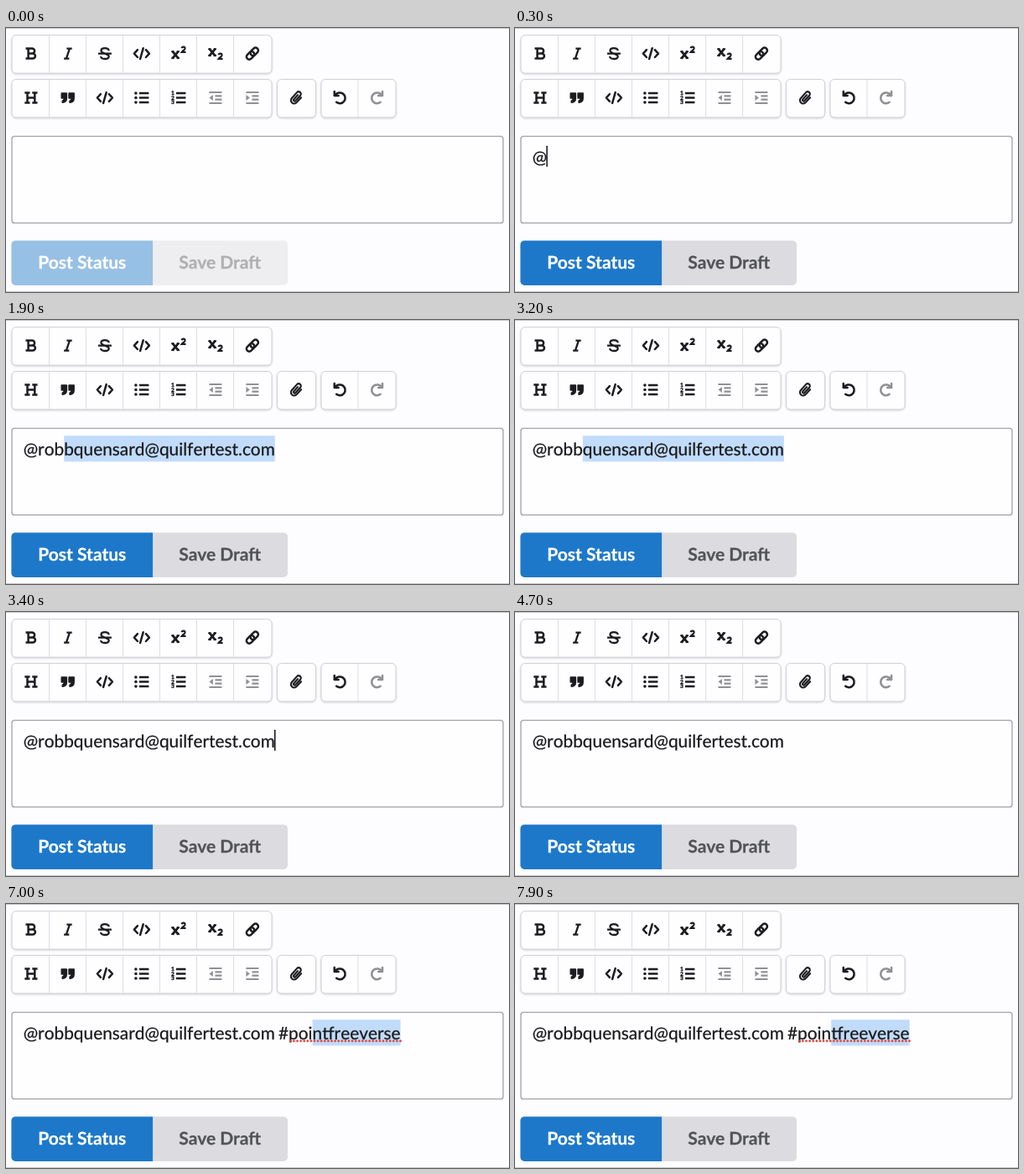
Write an HTML page that moves like this. It is 600 px wide and 316 px high and loops after 8000 ms.

```html
<!DOCTYPE html>
<html lang="en">
<head>
<meta charset="utf-8">
<title>Post editor</title>
<style>
  html, body { margin: 0; width: 100%; height: 100%; overflow: hidden; background: #fdfcfe; }
  svg { display: block; width: 600px; height: 316px; }
  text {
    font: 20.85px Lato, sans-serif; fill: #18191a; stroke: #18191a; stroke-width: .25;
    font-kerning: none; text-rendering: geometricPrecision; white-space: pre;
  }
  .label { font-size: 21px; font-weight: 700; font-kerning: normal; text-anchor: middle; }
  .panel { fill: #fefdff; stroke: #d1d0d4; filter: drop-shadow(0 1px 1px rgba(0, 0, 0, .16)); }
  .rule { stroke: #dedde1; }
  .icon { fill: none; stroke: #1b1c1d; stroke-width: 2.5; }
  .icon .solid { fill: #1b1c1d; stroke: none; }
  .icon text { font: 900 6.6px Lato, sans-serif; fill: #1b1c1d; }
  .dim { opacity: .48; }
  .round { stroke-linecap: round; stroke-linejoin: round; }
</style>
</head>
<body>
<svg viewBox="0 0 600 316">
  <path d="M0 .5H600M0 315.5H600" stroke="#c9c8cc"/>
  <g id="bar"></g>
  <rect x="7" y="129.6" width="586" height="103.8" rx="3" fill="#fefdff" stroke="#a2a1a6" stroke-width="1.3"/>
  <rect id="sel" y="138.5" height="31" fill="#c1dbfa"/>
  <text id="mention" x="20.7" y="162"></text>
  <text id="tag" x="325" y="162"></text>
  <path id="squiggle" d="M339.3 164H470.8" fill="none" stroke="#e2483d" stroke-width="2.8" stroke-linecap="round" stroke-dasharray="0 4.1"/>
  <rect id="caret" y="141" width="1.5" height="25" fill="#111"/>
  <g id="buttons">
    <path d="M175.4 254.4H11.4a5 5 0 0 0-5 5V303a5 5 0 0 0 5 5H175.4z" fill="#1d78c9"/>
    <path d="M175.4 254.4H331a5 5 0 0 1 5 5V303a5 5 0 0 1-5 5H175.4z" fill="#dcdce0"/>
    <text class="label" x="90.8" y="288" style="fill:#fff;stroke:#fff">Post Status</text>
    <text class="label" x="255.2" y="288" style="fill:#525355;stroke:#525355">Save Draft</text>
  </g>
</svg>
<script>
const $ = id => document.getElementById(id);

// Toolbar
const path = (d, attrs = '') => `<path d="${d}" ${attrs}/>`;
const two = y => path(`M3.6 ${y - 5}c.8-2.3 4.4-1.8 4 .6c-.3 1.4-2.5 2.6-3.8 4.2h4.8`, 'stroke-width="2.2"');
const ex = y => path(`M-7.6 ${y - 4.5}l7.6 9M0 ${y - 4.5}l-7.6 9`, 'stroke-width="2.8"') +
  path(`M-8.6 ${y - 4}h3.2M-2.2 ${y - 4}h3.2M-8.6 ${y + 4}h3.2M-2.2 ${y + 4}h3.2`, 'stroke-width="1.8"');
const rows = [-5.5, 0, 5.5];
const lines = path(rows.map(y => `M-3 ${y}H8.5`).join(''));
const shift = path('M-7.5-6.5H7.5M-.5-2.2H7.5M-.5 2.2H7.5M-7.5 6.5H7.5', 'stroke-width="2.2"');
const mark = x => path(`M${x}-5.5h6v6.2q0 4.5-5 5v-2q2.2-.6 2.2-3.2h-3.2z`,
  'style="fill:#1b1c1d" stroke-width="1.6" stroke-linejoin="round"');
const turn = path('M-5.8-3.2A6.4 6.4 0 1 1-4.5 5.3M-6.9-7.4V-2.5H-2', 'class="round"');

const icons = {
  bold: path('M-6.4-6H1.2a3 3 0 0 1 0 6H-3.3M1.2 0H2a3 3 0 0 1 0 6H-6.4M-3.3-6V6'),
  italic: path('M-1.5-6H4.8M-4.8 6H1.5M2-6L-2 6', 'stroke-width="2.3"'),
  strike: path('M-8 0H8M4.8-3.4C4.4-7.4-4.4-7.4-4.4-3.4C-4.4 0 4.8 0 4.8 3.4C4.8 7.4-4.4 7.4-4.8 3.4', 'stroke-width="2.3"'),
  code: path('M-5-4.4L-9 0L-5 4.4M5-4.4L9 0L5 4.4M1.8-6.4L-1.8 6.4', 'class="round"'),
  sup: ex(1.5) + two(-1.5),
  sub: ex(-1.5) + two(6.5),
  link: `<g transform="rotate(-45)"><rect x="-8.6" y="-3.3" width="10.6" height="6.6" rx="3.3"/>
    <rect x="-2" y="-3.3" width="10.6" height="6.6" rx="3.3"/></g>`,
  head: path('M-7.6-6h6.2M1.4-6h6.2M-7.6 6h6.2M1.4 6h6.2M-4.4-6V6M4.4-6V6M-4.4 0H4.4'),
  quote: mark(-7.6) + mark(1.2),
  bullets: rows.map(y => `<circle class="solid" cx="-7" cy="${y}" r="1.8"/>`).join('') + lines,
  numbers: rows.map((y, i) => `<text x="-8.8" y="${y + 2.4}">${i + 1}</text>`).join('') + lines,
  outdent: shift + path('M-7.5 0l4.5-3.4v6.8z', 'class="solid"'),
  indent: shift + path('M-3 0l-4.5-3.4v6.8z', 'class="solid"'),
  clip: path('M4-4V4a3.9 3.9 0 0 1-7.8 0V-5.2a2.7 2.7 0 0 1 5.4 0V3.6a1.3 1.3 0 0 1-2.6 0V-3.6',
    'class="round" stroke-width="2.1" transform="rotate(42)"'),
  undo: turn,
  redo: `<g transform="scale(-1 1)">${turn}</g>`
};

const dim = ['outdent', 'indent', 'redo'];
const group = (x, y, width, names) => {
  const cell = (width - 2) / names.length;
  return `<rect class="panel" x="${x}" y="${y}" width="${width}" height="45.5" rx="5"/>` +
    names.map((name, i) => {
      const left = x + .5 + i * cell;
      const rule = i ? path(`M${left} ${y + .5}v44.5`, 'class="rule"') : '';
      return `${rule}<g class="icon ${dim.includes(name) ? 'dim' : ''}"
        transform="translate(${left + cell / 2 + .4} ${y + 22})">${icons[name]}</g>`;
    }).join('');
};
$('bar').innerHTML =
  group(7, 8.6, 310, ['bold', 'italic', 'strike', 'code', 'sup', 'sub', 'link']) +
  group(7, 61.5, 310, ['head', 'quote', 'code', 'bullets', 'numbers', 'outdent', 'indent']) +
  group(323.5, 61.5, 46, ['clip']) +
  group(376, 61.5, 89, ['undo', 'redo']);

// Typing
const MENTION = '@robbquensard@quilfertest.com';
const TAG = '#pointfreeverse';
const M = MENTION.length, G = M + 1, END = G + TAG.length;
const LOOP = 8000;

// start time, cursor index, shown characters, caret visible
const steps = [
  [0, 0, 0, 0], [100, 1, 1, 1], [800, 1, 1, 0], [1000, 2, 2, 1], [1500, 3, 3, 1],
  [1900, 4, M, 0], [2400, 5, M, 0], [3400, M, M, 1], [4000, M, M, 0],
  [4200, G, G, 1], [4700, G, G, 0], [5100, G + 1, G + 1, 1], [5600, G + 1, G + 1, 0],
  [6000, G + 2, G + 2, 1], [6400, G + 3, G + 3, 1], [6900, G + 4, END, 0], [7900, G + 5, END, 0]
];

const edges = (node, text, x) => {
  node.textContent = text;
  return [...text, ''].map((_, i) => x + (i ? node.getSubStringLength(0, i) : 0));
};
const stops = [...edges($('mention'), MENTION, 20.7), ...edges($('tag'), TAG, 325)];

const show = (id, on) => $(id).setAttribute('visibility', on ? 'visible' : 'hidden');
const put = (id, text) => { if ($(id).textContent !== text) $(id).textContent = text; };

function draw(t) {
  const [, at, shown, caret] = steps.findLast(step => step[0] <= t);
  put('mention', MENTION.slice(0, shown));
  put('tag', TAG.slice(0, Math.max(0, shown - G)));
  $('sel').setAttribute('x', stops[at]);
  $('sel').setAttribute('width', Math.max(0, stops[shown] - stops[at]));
  $('caret').setAttribute('x', stops[at] - .8);
  show('caret', caret);
  show('squiggle', t >= 7000);
  const fade = t < 100 ? 0 : Math.min(1, (t - 50) / 200);
  $('buttons').setAttribute('opacity', .45 + .55 * fade);
}

const start = performance.now();
function tick() {
  draw((performance.now() - start) % LOOP);
  requestAnimationFrame(tick);
}
tick();
</script>
</body>
</html>
```
